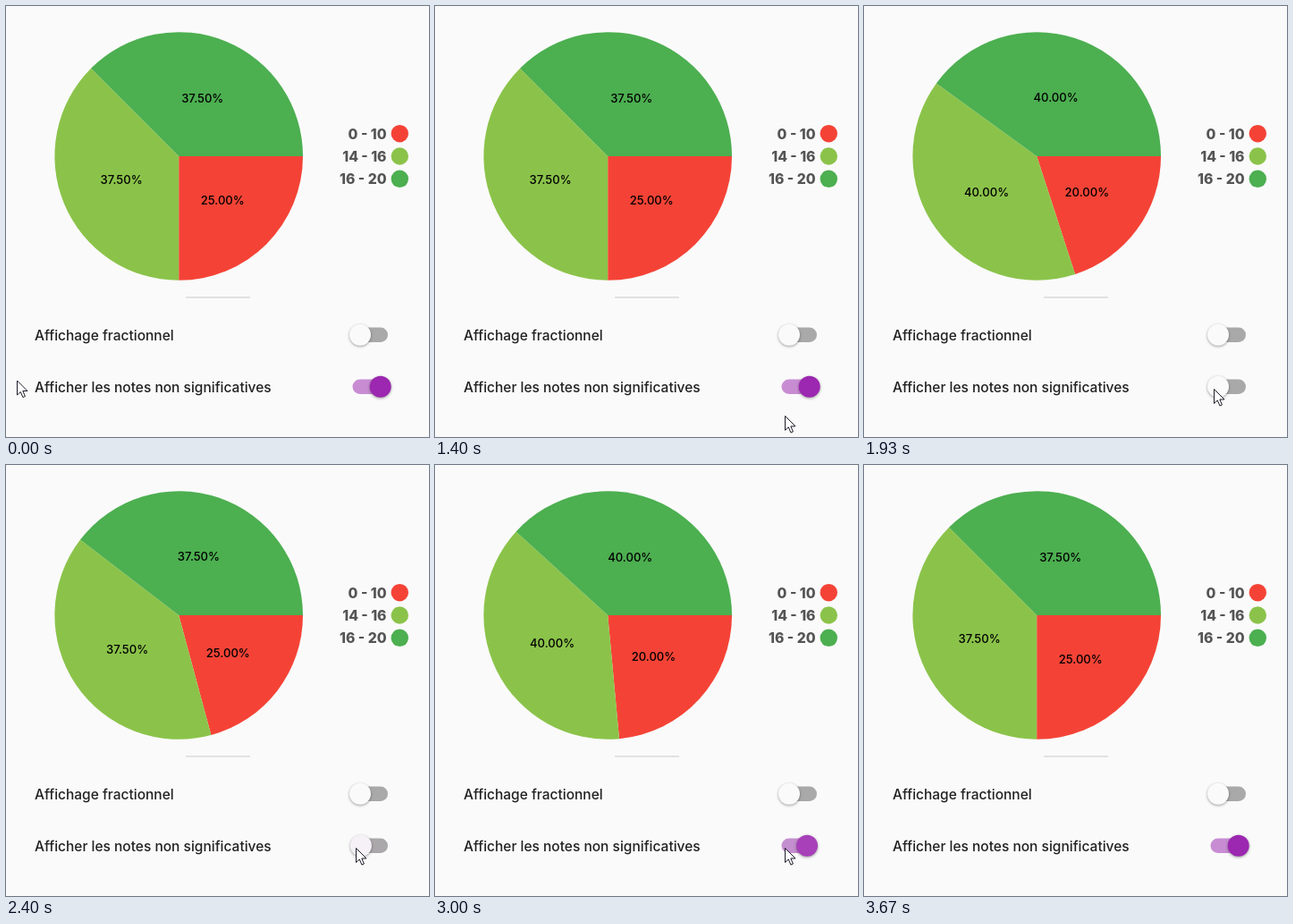
An HTML page for the animation above (4140 ms loop, 473 px wide and 482 px high).

```html
<!DOCTYPE html>
<html lang="fr">
<head>
<meta charset="utf-8">
<style>
html, body { margin: 0; width: 100%; height: 100%; overflow: hidden; background: #fafafa; }
svg { display: block; width: 473px; height: 482px; font-family: Inter, "Open Sans", sans-serif; }
.label { font-size: 15.5px; font-weight: 500; fill: #212121; }
.share { font-size: 13.1px; font-weight: 500; fill: #000; text-anchor: middle; }
.legend { font-size: 15.7px; font-weight: 800; fill: #545454; text-anchor: end; }
.thumb { filter: drop-shadow(0 1px 1.5px rgba(0, 0, 0, .38)); }
</style>
</head>
<body>
<svg viewBox="0 0 473 482">
  <g id="pie"></g>
  <g id="legend"></g>
  <rect x="201" y="325" width="72" height="1.7" fill="#dedede"/>
  <text class="label" x="32" y="373.5">Affichage fractionnel</text>
  <text class="label" x="32" y="431.5">Afficher les notes non significatives</text>
  <rect x="387.5" y="359.5" width="39.5" height="16.5" rx="8.25" fill="#a9a9a9"/>
  <circle class="thumb" cx="396" cy="367.8" r="12" fill="#fafafa"/>
  <rect id="track" x="387.5" y="417.5" width="39.5" height="16.5" rx="8.25"/>
  <circle id="thumb" class="thumb" cy="425.8" r="12"/>
  <path id="cursor" d="M0 0V16L3.8 12.5 6.4 18.6 8.9 17.5 6.3 11.5H11.5Z" fill="#fff" stroke="#1c1c28"/>
</svg>
<script>
const LOOP = 4140, TICK = 1000 / 15, TOGGLE = 180;
const CX = 193.2, CY = 168, R = 138.8;
const RANGES = [["0 - 10", "#f44336"], ["14 - 16", "#8bc34a"], ["16 - 20", "#4caf50"]];
const CLICKS = [1722, 2371, 2947, 3430];
// time, x, y; no position means the pointer is outside the stage
const POINTER = [
  [0, 12.5, 419], [70, 10.5, 417.5], [270, 31, 441], [330],
  [1400, 391.5, 458.5], [1470, 391.5, 446], [1530, 391.5, 434], [1600, 391.5, 428.5],
  [3400, 390.5, 428.5], [3530, 390.5, 437], [3600, 388.5, 466], [3670]
];

const $ = id => document.getElementById(id);
const mix = (a, b, p) => a + (b - a) * p;
const mixColor = (a, b, p) => `rgb(${a.map((v, i) => Math.round(mix(v, b[i], p)))})`;

function add(parent, tag, attrs, text = "") {
  const el = document.createElementNS("http://www.w3.org/2000/svg", tag);
  for (const k in attrs) el.setAttribute(k, attrs[k]);
  el.textContent = text;
  return parent.appendChild(el);
}

RANGES.forEach(([name, fill], i) => {
  const y = 142.7 + i * 25.3;
  add($("legend"), "text", { class: "legend", x: 425.5, y: y + 5.8 }, name);
  add($("legend"), "circle", { cx: 440.3, cy: y, r: 9.7, fill });
});
const slices = RANGES.map(([, fill]) => add($("pie"), "path", { fill }));
const shares = RANGES.map(() => add($("pie"), "text", { class: "share" }));

function drawPie(off, isOff) {
  const red = mix(25, 20, off), green = (100 - red) / 2;
  const values = isOff ? [20, 40, 40] : [25, 37.5, 37.5];
  const at = (a, r) => [CX + r * Math.cos(a), CY + r * Math.sin(a)];
  let start = 0;
  [red, green, green].forEach((part, i) => {
    const end = start + part * Math.PI / 50;
    slices[i].setAttribute("d", `M${CX} ${CY}L${at(start, R)}A${R} ${R} 0 0 1 ${at(end, R)}Z`);
    const [x, y] = at((start + end) / 2, R / 2);
    shares[i].setAttribute("x", x);
    shares[i].setAttribute("y", y + 4.6);
    shares[i].textContent = values[i].toFixed(2) + "%";
    start = end;
  });
}

function drawToggle(off) {
  $("thumb").setAttribute("cx", mix(418.7, 396, off));
  $("thumb").setAttribute("fill", mixColor([156, 39, 176], [250, 250, 250], off));
  $("track").setAttribute("fill", mixColor([200, 140, 211], [169, 169, 169], off));
}

function drawPointer(t) {
  const [, x, y] = POINTER.findLast(k => k[0] <= t);
  $("cursor").style.display = x === undefined ? "none" : "";
  if (x !== undefined) $("cursor").setAttribute("transform", `translate(${x} ${y})`);
}

function draw(t) {
  const step = Math.floor((t + 3.4) / TICK) * TICK; // motion advances 15 times a second
  const clicks = CLICKS.filter(c => c <= step).length;
  const p = clicks ? Math.min(1, (step - CLICKS[clicks - 1]) / TOGGLE) : 1;
  const isOff = clicks % 2 === 1;
  const toward = v => isOff ? v : 1 - v;
  drawPie(toward(p), isOff);
  drawToggle(toward(p ** 1.75));
  drawPointer(t);
}

const begin = performance.now();
function frame() {
  draw((performance.now() - begin) % LOOP);
  requestAnimationFrame(frame);
}
frame();
</script>
</body>
</html>
```
